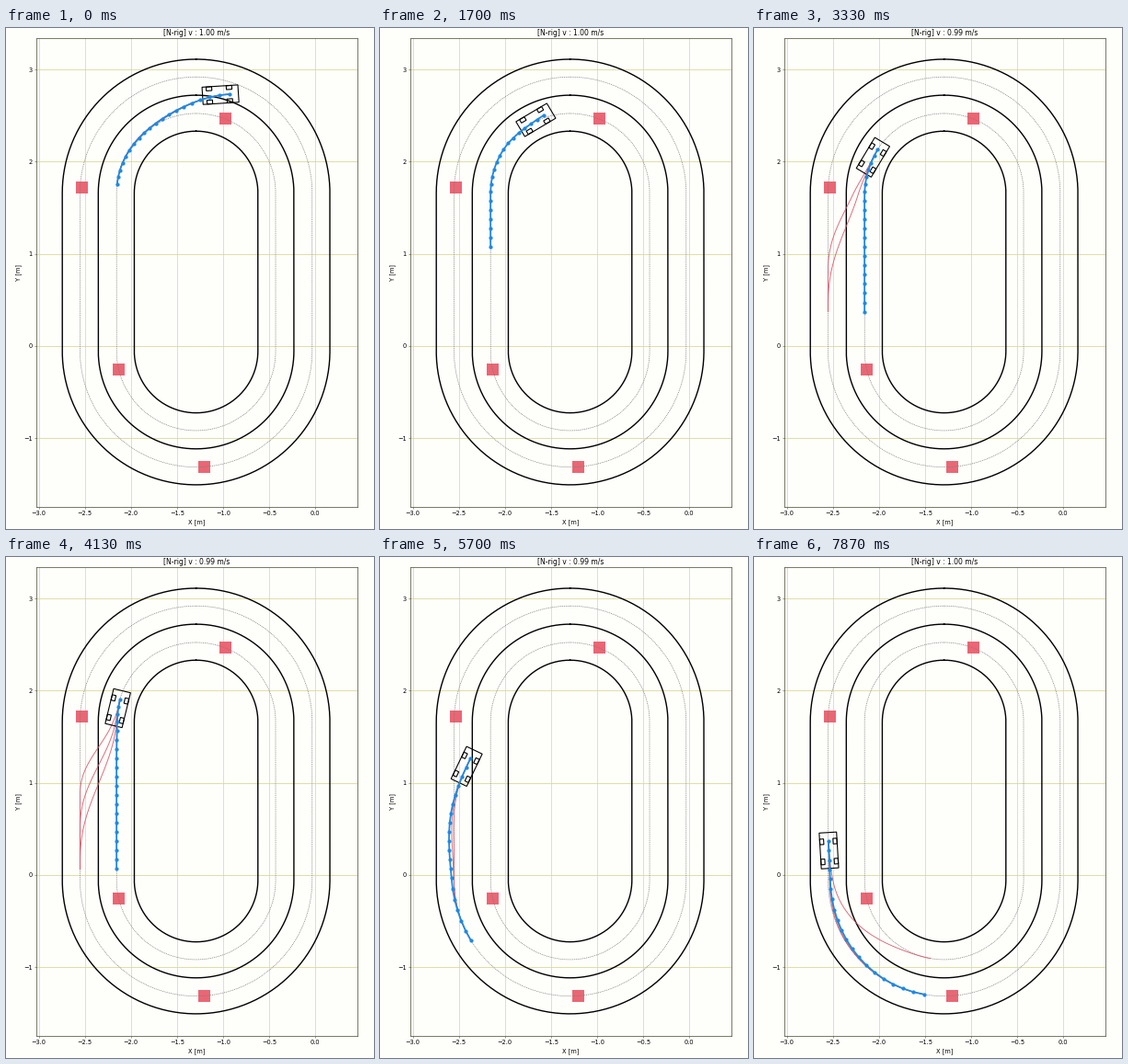
A matplotlib script that plays this animation: 400 by 545 pixels, repeating every 8000 ms.

```python
import numpy as np
import matplotlib.pyplot as plt
from matplotlib.animation import FuncAnimation
from matplotlib.patches import Polygon, Rectangle

W, H, DPI = 400, 545, 100
PX = 72 / DPI                      # one pixel in points
LOOP, INTERVAL = 8000, 40

PAPER, FRAME, RED, BLUE = "#fefefb", "#5a5a42", "#ea6674", "#2089e0"

# Track: two half circles joined by straights, distances in metres
CX, Y_TOP, STRAIGHT, R = -1.294, 1.66, 1.715, 1.06
LANE = 0.198
HORIZON = 1.9
OBSTACLES = [(-2.531, 1.719), (-0.976, 2.467), (-2.133, -0.250), (-1.205, -1.312)]

# Simulation updates: (first ms, last ms, count)
BURSTS = [(200, 900, 8), (1170, 1700, 6), (1930, 2170, 3), (2370, 3330, 10),
          (3570, 4130, 6), (4330, 4600, 7), (4800, 5700, 10), (5730, 5770, 2),
          (5900, 6870, 9), (7130, 7870, 8)]
UPDATES = np.concatenate([np.linspace(*b) for b in BURSTS])

# Car along the track: update, distance, lateral offset, lateral slope
KEY_STEP = [0, 14, 27, 33, 50, 61, 69]
KEY_S = np.array([-2.01, -1.316, -0.613, -0.305, 0.394, 0.887, 1.296])
KEY_N = np.array([0.071, -0.171, -0.200, -0.200, 0.019, 0.184, 0.194])
KEY_SLOPE = np.array([-0.437, -0.175, -0.03, -0.04, 0.48, 0.105, -0.06])
SWITCH = 34                        # update at which the outer lane is chosen


def to_xy(s, n):
    """Track coordinates (distance, offset) to the plane."""
    on_line = np.clip(s, 0, STRAIGHT)
    a = np.pi + (s - on_line) / R
    return CX + (R + n) * np.cos(a), Y_TOP - on_line + (R + n) * np.sin(a)


def offset(s):
    """Cubic Hermite lateral offset of the car."""
    i = int(np.clip(np.searchsorted(KEY_S, s) - 1, 0, len(KEY_S) - 2))
    h = KEY_S[i + 1] - KEY_S[i]
    u = (s - KEY_S[i]) / h
    blend = u * u * (3 - 2 * u)
    return (KEY_N[i] * (1 - blend) + KEY_N[i + 1] * blend
            + h * KEY_SLOPE[i] * u * (1 - u) ** 2
            - h * KEY_SLOPE[i + 1] * u * u * (1 - u))


def plan(s, n, slope, goal, reach, count):
    """Quintic lane change reaching goal after a share of the horizon."""
    d = np.linspace(0, HORIZON, count)
    length = reach * HORIZON
    u = np.minimum(d / length, 1)
    ease = u**3 * (10 - 15 * u + 6 * u * u)
    lead = u - 6 * u**3 + 8 * u**4 - 3 * u**5
    return to_xy(s + d, n + (goal - n) * ease + slope * length * lead)


def outline(n):
    s = np.linspace(-np.pi * R / 2, STRAIGHT + np.pi * R / 2, 300)
    x, y = to_xy(s, n)
    return np.r_[x, 2 * CX - x[::-1]], np.r_[y, y[::-1]]


def box(x0, x1, y0, y1):
    return np.array([(x0, y0), (x1, y0), (x1, y1), (x0, y1)])


BODY = box(-0.097, 0.292, -0.094, 0.094)
WHEELS = [box(x - 0.03, x + 0.03, y - 0.021, y + 0.021)
          for x in (0, 0.218) for y in (-0.072, 0.072)]

plt.rcParams["font.family"] = "DejaVu Sans"
fig = plt.figure(figsize=(W / DPI, H / DPI), dpi=DPI, facecolor=PAPER)
ax = fig.add_axes([32.5 / W, 1 - 520.5 / H, 349 / W, 509.5 / H], facecolor=PAPER)
ax.set_xlim(-3.03, 0.4496)
ax.set_ylim(-1.740, 3.339)
ax.set_xticks(np.arange(-3, 0.1, 0.5))
ax.set_yticks(range(-1, 4))
ax.tick_params(labelsize=6.7 * PX, length=2.2 * PX, width=0.6 * PX,
               pad=1.9 * PX, color=FRAME)
ax.grid(axis="x", color="#d8d8be", lw=0.8 * PX)
ax.grid(axis="y", color="#d8d892", lw=0.8 * PX)
ax.set_axisbelow(True)
for spine in ax.spines.values():
    spine.set(linewidth=0.8 * PX, color=FRAME)


def label(x, y, text, size, **kw):
    return fig.text(x / W, 1 - y / H, text, fontsize=size * PX,
                    ha="center", va="center", **kw)


label(207, 537.5, "X [m]", 6.7)
label(13.5, 266, "Y [m]", 6.7, rotation=90)
title = label(207, 6, "", 7.6)

for edge in (-0.39, 0, 0.39):
    ax.plot(*outline(edge), color="black", lw=1.4 * PX)
for side in (-LANE, LANE):
    ax.plot(*outline(side), color="#7c7c78", lw=0.7 * PX, ls=(0, (1.5, 1.2)))
for x, y in OBSTACLES:
    ax.add_patch(Rectangle((x - 0.065, y - 0.065), 0.13, 0.13, color=RED, lw=0))

parts = [ax.add_patch(Polygon(p, fill=False, ec="black", lw=1.1 * PX, zorder=4))
         for p in [BODY] + WHEELS]
options = [ax.plot([], [], color="#d65566", lw=0.9 * PX, alpha=0.9, zorder=3)[0]
           for _ in range(3)]
path, = ax.plot([], [], "o-", color=BLUE, lw=1.8 * PX, ms=4.2 * PX,
                mew=0, zorder=5)


def choose(step):
    """Chosen plan and the other candidates, each as (goal, reach)."""
    goal = LANE if step >= SWITCH else -LANE
    if 20 < step < SWITCH:         # looking for a way around the obstacle
        opens = ((1, 21), (0.8, 25), (0.6, 30))
        return (goal, 0.4), [(LANE, k) for k, start in opens if step >= start]
    if 8 <= step < SWITCH or 55 <= step < 65:
        return (goal, 0.4), []     # settled in the lane
    others = [(goal, 0.6), (goal, 0.8)]
    if step >= 66:
        others.append((-LANE, 1))
    return (goal, 1), others


def update(frame):
    now = (frame + 1) * INTERVAL - 1
    step = int(np.searchsorted(UPDATES, now, side="right"))
    s = np.interp(step, KEY_STEP, KEY_S)
    n, eps = offset(s), 1e-3
    slope = (offset(s + eps) - offset(s - eps)) / (2 * eps)

    here = np.array(to_xy(s, n))
    ahead = np.array(to_xy(s + eps, n + slope * eps)) - here
    c, k = ahead / np.hypot(*ahead)
    turn = np.array([[c, k], [-k, c]])
    for patch, shape in zip(parts, [BODY] + WHEELS):
        patch.set_xy(shape @ turn + here)

    chosen, others = choose(step)
    path.set_data(*plan(s, n, slope, *chosen, 20))
    for i, line in enumerate(options):
        line.set_visible(i < len(others))
        if i < len(others):
            line.set_data(*plan(s, n, slope, *others[i], 60))

    speed = 0.99 if 16 <= step < 56 else 1.00
    title.set_text(f"[N-rig] v : {speed:.2f} m/s")
    return [*parts, *options, path, title]


anim = FuncAnimation(fig, update, frames=LOOP // INTERVAL, interval=INTERVAL,
                     repeat=True, repeat_delay=0, blit=False)
plt.show()
```
